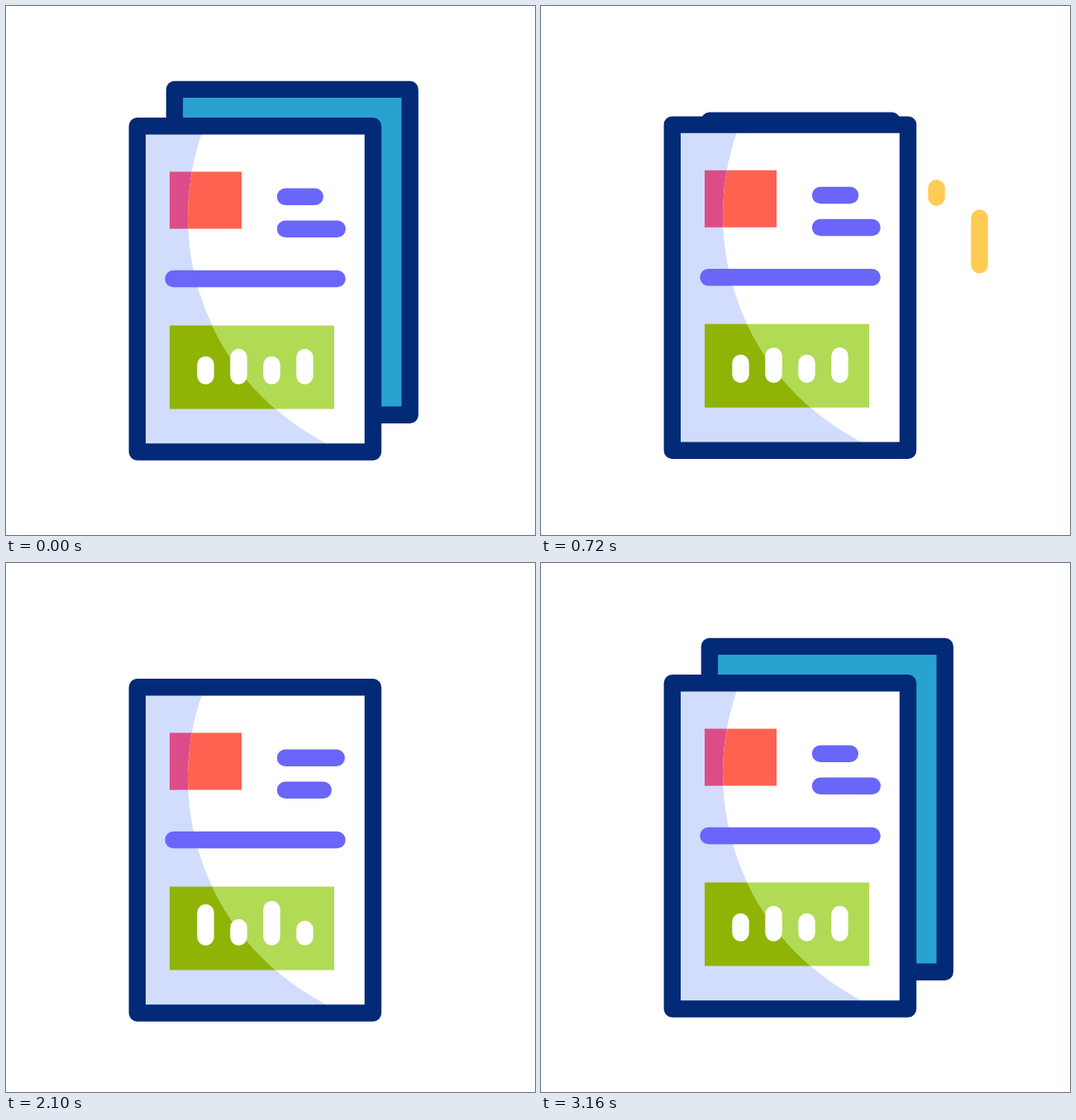
These frames come from a looping animation (640 by 640 pixels, 3340 ms). An HTML page:

```html
<!DOCTYPE html>
<html lang="en">
<head>
<meta charset="utf-8">
<title>Report pages</title>
<style>
  html, body { margin: 0; height: 100%; overflow: hidden; background: #fff; }
  svg { display: block; width: 100%; height: 100%; }
  path, .frame { stroke-width: 20.4; stroke-linecap: round; stroke-linejoin: round; }
  .frame { stroke: #032a77; }
  .spark { stroke: #ffcb52; }
  .text { stroke: #6a66fa; }
  .bar { stroke: #fff; }
</style>
</head>
<body>
<svg viewBox="0 0 640 640">
  <clipPath id="light"><circle cx="528" cy="255" r="308"/></clipPath>
  <g id="sparks"></g>
  <rect id="back" class="frame" x="203.9" fill="#28a2ce"/>
  <g id="front">
    <rect x="159" y="145" width="285" height="394" fill="#d2dcfd"/>
    <rect x="198" y="200.5" width="87" height="69" fill="#dc4c88"/>
    <rect x="198" y="386.5" width="199" height="101" fill="#8fb406"/>
    <g clip-path="url(#light)">
      <rect x="159" y="145" width="285" height="394" fill="#fff"/>
      <rect x="198" y="200.5" width="87" height="69" fill="#ff6251"/>
      <rect x="198" y="386.5" width="199" height="101" fill="#b1da55"/>
    </g>
    <rect class="frame" x="158.8" y="145.3" width="285.2" height="394.2" fill="none"/>
    <path class="text" d="M202.5 330H400.6"/>
  </g>
</svg>
<script>
const LOOP = 3340;
const CAP = 10.2;
const KEY_TIMES = [700, 1060, 1400, 1750, 2100, 2380, 2580, 2700];

const back = document.getElementById('back');
const front = document.getElementById('front');
const sparkLayer = document.getElementById('sparks');

function addPath(parent, name) {
  const path = document.createElementNS('http://www.w3.org/2000/svg', 'path');
  path.setAttribute('class', name);
  return parent.appendChild(path);
}

// Right ends of the two short text lines
const texts = [
  { y: 230.7, keys: [384, 410, 392, 384, 410, 400, 385, 384] },
  { y: 269.7, keys: [411, 385, 407, 411, 394, 388, 411, 411] }
].map(o => ({ ...o, path: addPath(front, 'text') }));

// Heights of the chart bars
const bars = [
  { x: 241.5, keys: [34, 54, 48, 32, 50, 32, 39, 34] },
  { x: 281.5, keys: [43, 28, 42, 52, 32, 50, 41, 43] },
  { x: 321.5, keys: [34, 50, 41, 30, 54, 44, 34, 34] },
  { x: 361.5, keys: [43, 30, 50, 42, 30, 48, 43, 43] }
].map(o => ({ ...o, path: addPath(front, 'bar') }));

// Each stroke grows during `head` and is wiped away during `tail`
const sparks = [
  { from: [530.5, 256.5], to: [530.5, 321], head: [460, 793], tail: [727, 1060] },
  { from: [478.5, 220.5], to: [478.5, 277.5], head: [627, 960], tail: [893, 1226] },
  { from: [150, 91.5], to: [92, 48], head: [2640, 2960], tail: [2800, 3120] },
  { from: [515, 509], to: [568, 557], head: [2660, 2990], tail: [2810, 3140] }
].map(o => ({ ...o, path: addPath(sparkLayer, 'spark') }));

function ease(t, start, end) {
  const u = Math.min(1, Math.max(0, (t - start) / (end - start)));
  return u * u * (3 - 2 * u);
}

function keyed(t, keys) {
  return KEY_TIMES.slice(1).reduce((value, end, i) =>
    value + (keys[i + 1] - keys[i]) * ease(t, KEY_TIMES[i], end), keys[0]);
}

function drawSpark(t, { from, to, head, tail, path }) {
  const a = ease(t, ...tail), b = ease(t, ...head);
  const at = u => from.map((v, i) => v + (to[i] - v) * u);
  path.setAttribute('d', b - a > 0.002 ? `M${at(a)}L${at(b)}` : '');
}

function draw(t) {
  const rise = ease(t, 190, 460);
  const fall = ease(t, 460, 793);
  const open = ease(t, 2490, 2823);
  const y = -51 * rise + 56 * fall - 5 * open;
  const tuck = fall - open;

  front.setAttribute('transform', `translate(0 ${y})`);
  back.setAttribute('y', 100.9 + y + 45 * tuck);
  back.setAttribute('width', 284.8 - 73 * tuck);
  back.setAttribute('height', 393.8 - 29 * tuck);

  for (const o of texts) o.path.setAttribute('d', `M338 ${o.y}H${keyed(t, o.keys) - CAP}`);
  for (const o of bars) o.path.setAttribute('d', `M${o.x} 447.5v${2 * CAP - keyed(t, o.keys)}`);
  for (const o of sparks) drawSpark(t, o);
}

const begin = performance.now();
function tick() {
  draw((performance.now() - begin) % LOOP);
  requestAnimationFrame(tick);
}
tick();
</script>
</body>
</html>
```
